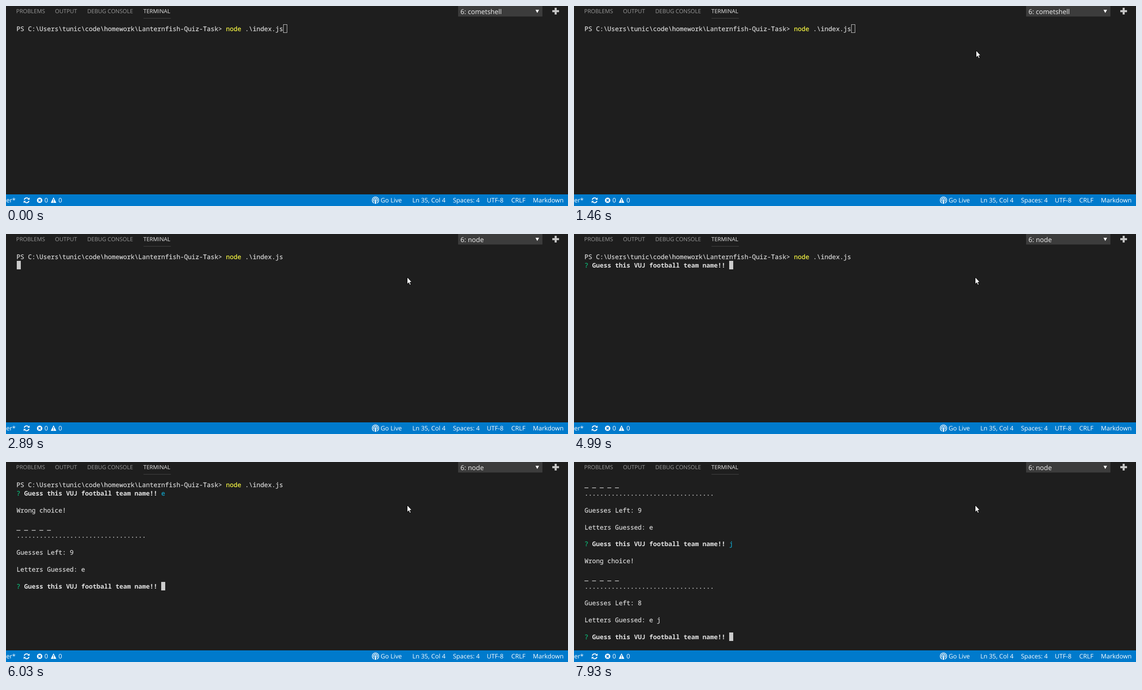
These frames come from a looping animation (1253 px wide and 447 px high, 8 s). An HTML page:

```html
<!DOCTYPE html>
<html lang="en">
<head>
<meta charset="utf-8">
<title>Terminal word game</title>
<style>
  html, body { margin: 0; width: 100%; height: 100%; overflow: hidden; background: #1e1e1e; }
  svg { display: block; width: 100%; height: 100%; }
  text { white-space: pre; text-rendering: geometricPrecision; }
  .ui { font-family: "Open Sans", "Noto Sans", sans-serif; }
  .tabs { font-size: 12.45px; fill: #999; }
  .status { font-size: 13.8px; fill: #fff; }
  #terminal { font: 14.15px "Noto Sans Mono", monospace; color: #d8d8d8; }
  #terminal text { fill: currentColor; stroke: currentColor; stroke-width: .25px; }
  #terminal .bold { font-weight: bold; color: #e2e2e2; stroke: none; }
  .green { color: #0dbc79; }
  .yellow { color: #f5f543; }
  .cyan { color: #11a8cd; }
</style>
</head>
<body>
<svg viewBox="0 0 1253 447">
  <rect width="1253" height="447" fill="#1e1e1e"/>

  <g class="ui tabs">
    <text x="22.7" y="16">PROBLEMS</text>
    <text x="109.3" y="16">OUTPUT</text>
    <text x="181.2" y="16">DEBUG CONSOLE</text>
    <text x="306.3" y="16" fill="#e7e7e7">TERMINAL</text>
  </g>
  <rect x="306.5" y="27" width="61" height="1" fill="#454545"/>

  <rect x="1008" width="188" height="23.5" fill="#3c3c3c"/>
  <text id="shell" class="ui" x="1013.3" y="17.5" font-size="14.9" fill="#f0f0f0"></text>
  <path d="M1180.5 8.5h8l-4 7z" fill="#fff"/>
  <path d="M1218 11.5h15M1225.5 4v15" stroke="#c8c8c8" stroke-width="4.5"/>

  <g id="terminal"></g>

  <rect y="421" width="1253" height="26" fill="#007acc"/>
  <g class="ui status">
    <text x="21.4" y="439.3" text-anchor="end">ter*</text>
    <text x="85.7" y="439.3">0</text>
    <text x="117" y="439.3">0</text>
    <text x="835.3" y="439.3">Go Live</text>
    <text x="906" y="439.3">Ln 35, Col 4</text>
    <text x="996.5" y="439.3">Spaces: 4</text>
    <text x="1072" y="439.3">UTF-8</text>
    <text x="1126.5" y="439.3">CRLF</text>
    <text x="1174.8" y="439.3">Markdown</text>
  </g>
  <g fill="none" stroke="#fff" stroke-width="2">
    <path d="M40.7 433a5.4 5.4 0 0 1 9.6-2M51.3 435.5a5.4 5.4 0 0 1-9.6 2"/>
    <path d="M52.6 428v5h-5zM39.4 440.5v-5h5z" fill="#fff" stroke="none"/>
    <circle cx="75" cy="434.3" r="6" fill="#fff" stroke="none"/>
    <path d="M72.5 431.8l5 5m0-5l-5 5" stroke="#007acc"/>
    <path d="M106 428.5l5.5 11h-11z" fill="#fff" stroke-width="1" stroke-linejoin="round"/>
    <path d="M106 431.5v4M106 436.7v1.8" stroke="#007acc" stroke-width="1.5"/>
    <g stroke-width="1.5">
      <path d="M820.5 440.5a7.3 7.3 0 1 1 6.500 0M820.8 436.800a4.200 4.200 0 1 1 5.900 0"/>
      <circle cx="823.75" cy="433.7" r="1.8" fill="#fff" stroke="none"/>
      <path d="M823.75 435.5v6.5" stroke-width="3"/>
    </g>
  </g>

  <circle id="click" cx="894.5" cy="96" r="14.5" fill="#ff0" fill-opacity=".47"/>
  <path id="pointer" d="M.5 .5V16L4 12.7 6.3 18 8.8 17 6.5 11.8H11z" fill="#fff" stroke="#000"/>
  <circle id="busy" cx="908" cy="97" r="5.4" fill="none" stroke="#1f97f4" stroke-width="3.2"/>
</svg>
<script>
const LOOP = 8000, LEFT = 24, TOP = 41.4, CELL = 8.49, LINE = 18.86;
const byId = id => document.getElementById(id);
const show = (id, on) => byId(id).setAttribute('visibility', on ? 'visible' : 'hidden');

// Pointer strokes: start time, end time, number of steps, first and last place.
const strokes = [
  { from: 110, to: 520, steps: 8, a: [1062, 416], b: [929, 230] },
  { from: 920, to: 1080, steps: 4, a: [919, 192], b: [904, 134] },
  { from: 1460, to: 1510, steps: 2, a: [896, 99], b: [894, 96] }
];

function pointerAt(t) {
  const s = strokes.filter(s => t >= s.from).pop();
  if (!s) return null;
  const last = s.steps - 1;
  const step = Math.min(last, Math.floor((t - s.from) / (s.to - s.from) * last + 1e-6));
  const k = 1 - (1 - step / last) ** 1.3;
  return s.a.map((v, i) => Math.round(v + (s.b[i] - v) * k));
}

function terminalAt(t) {
  const scroll = t >= 7930 ? 5 : 0;
  const lineTop = row => TOP + (row - scroll) * LINE;
  let html = '';
  const put = (row, col, text, style = '') => {
    if (row < scroll) return;
    const x = LEFT - .4 + col * CELL, y = Math.round(lineTop(row) + 14.8);
    html += `<text class="${style}" x="${x}" y="${y}">${text}</text>`;
  };
  const cursor = (row, col, focused = true) => {
    const x = Math.floor(LEFT + col * CELL), y = Math.round(lineTop(row));
    html += focused
      ? `<rect x="${x}" y="${y}" width="9" height="19" fill="#ccc"/>`
      : `<rect x="${x + .5}" y="${y + .5}" width="8" height="18" fill="none" stroke="#ccc"/>`;
  };
  const ask = row => {
    put(row, 0, '?', 'green');
    put(row, 2, 'Guess this VUJ football team name!!', 'bold');
  };
  const result = (row, left, letters) => {
    put(row, 0, 'Wrong choice!');
    put(row + 2, 0, '_ _ _ _ _');
    put(row + 3, 0, '.'.repeat(34));
    put(row + 5, 0, 'Guesses Left: ' + left);
    put(row + 7, 0, 'Letters Guessed: ' + letters);
  };
  // One guess: prompt, typed letter, enter, result.
  const guess = (row, letter, left, letters, times) => {
    const [asked, typed, entered, printed] = times;
    if (t < asked) return;
    ask(row);
    if (t >= typed) put(row, 38, letter, t >= entered ? 'cyan' : '');
    if (t >= printed) result(row + 2, left, letters);
    if (t < entered) cursor(row, t < typed ? 38 : 39);
    else if (t < printed) cursor(row + 1, 0);
  };

  put(0, 0, 'PS C:\\Users\\tunic\\code\\homework\\Lanternfish-Quiz-Task&gt;');
  put(0, 55, 'node', 'yellow');
  put(0, 60, '.\\index.js');
  if (t < 2740) cursor(0, 70, t >= 1970);
  else if (t < 4990) cursor(1, 0);

  guess(1, 'e', 9, 'e', [4990, 5530, 5910, 5970]);
  if (t >= 5970 && t < 6030) cursor(12, 0);
  guess(12, 'j', 8, 'e j', [6030, 7420, 7860, 7930]);
  if (t >= 7930) {
    ask(23);
    cursor(23, 38);
  }
  return html;
}

let drawn = '';
function render(t) {
  const html = terminalAt(t);
  if (html !== drawn) byId('terminal').innerHTML = drawn = html;
  byId('shell').textContent = t < 2890 ? '6: cometshell' : '6: node';

  const place = pointerAt(t);
  show('pointer', place);
  if (place) byId('pointer').setAttribute('transform', `translate(${place})`);
  show('click', t >= 1700 && t < 1970);
  show('busy', t >= 7470 && t < 7860);
}

const start = performance.now();
function frame() {
  render((performance.now() - start) % LOOP);
  requestAnimationFrame(frame);
}
frame();
</script>
</body>
</html>
```
